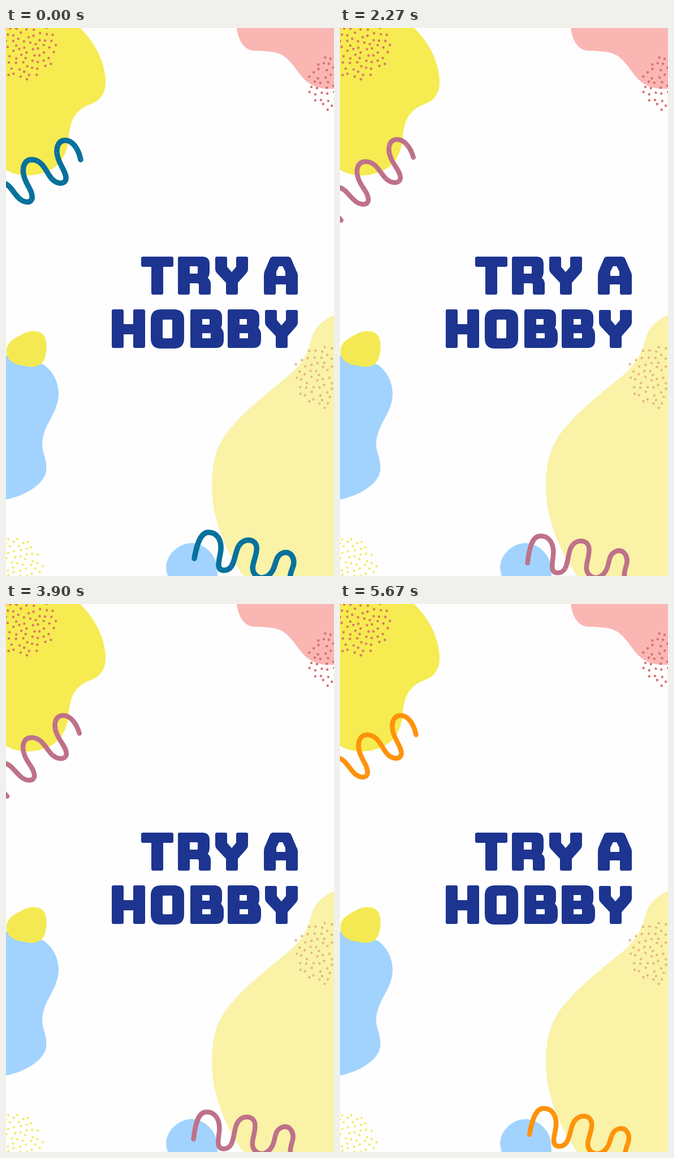
Recreate the animation shown at these times as an HTML page. Size 580 by 966 pixels, loop 5710 ms.

```html
<!DOCTYPE html>
<html lang="en">
<head>
<meta charset="utf-8">
<title>Try a hobby</title>
<style>
html, body { margin: 0; width: 100%; height: 100%; overflow: hidden; background: #fefefe; }
svg { display: block; width: 100%; height: 100%; }
.letters { fill: #1d3590; stroke: #1d3590; stroke-width: 6; stroke-linejoin: round; fill-rule: evenodd; }
.words { font: 900 80px Inter, sans-serif; fill: none; text-anchor: end; }
.line, .flecks { fill: none; stroke-linecap: round; stroke-linejoin: round; }
.flecks { stroke: #fff; stroke-width: 1.2; stroke-dasharray: 0 23 0 41 0 13 0 57; opacity: .6; }
</style>
</head>
<body>
<svg viewBox="0 0 580 966">
  <defs>
    <path id="upper" d="M132 232C128 212 117 198 105 198C91 198 87 214 92 229C96 243 107 255 106 266C104 277 90 275 81 266C71 255 66 233 46 232C31 232 28 248 32 262C36 277 48 288 46 301C43 310 31 307 24 301C13 291 8 277 -4 273"/>
    <path id="lower" d="M333 935C337 913 343 889 358 889C373 889 381 902 380 919C379 934 369 955 385 956C405 957 403 928 411 914C419 899 440 899 443 914C446 931 428 951 441 964C449 973 463 970 471 957C478 946 476 929 491 925C505 922 511 936 508 948C505 957 501 964 502 975"/>
    <path id="Y" d="M3 3H18V19L29 32L40 19V3H55V22Q55 25 53 27L37 45V64H22V45L5 27Q3 25 3 22Z"/>
    <path id="B" d="M3 3H42Q53 3 53 14V24Q53 30 50 33Q56 37 56 44V54Q56 65 45 65H3ZM18 14H33Q37 14 37 18V26Q37 30 33 30H18ZM18 39H35Q39 39 39 43V50Q39 54 35 54H18Z"/>
  </defs>

  <path fill="#f6eb51" d="M0 0H131C160 28 177 65 176 98C175 118 164 129 150 134C124 143 113 162 111 192C110 212 102 236 82 248C58 262 25 265 0 250Z"/>
  <path fill="#fab6b3" d="M408 0C411 20 418 36 436 40C458 41 478 40 492 50C508 62 515 78 527 90C539 102 556 109 580 107V0Z"/>
  <path fill="#f9f2a7" d="M580 506C555 517 543 534 539 552C533 578 518 598 497 615C450 653 403 690 380 730C360 765 361 825 371 863C380 897 396 935 420 966H580Z"/>
  <path fill="#a1d3fe" d="M0 577L66 593C83 605 94 625 93 648C91 680 65 700 64 733C64 750 73 760 71 780C69 805 30 826 0 831Z"/>
  <path fill="#f4e953" d="M1 567C3 552 17 546 32 538C46 531 66 533 70 548C73 562 72 577 66 587C60 597 48 599 35 596C18 594 -1 588 1 567Z"/>
  <path fill="#a1d3fe" d="M283 950C285 925 308 907 330 908C352 909 372 930 373 950L374 966H286C284 960 283 955 283 950Z"/>
  <g id="dots"></g>

  <text class="words" x="516" y="467">TRY A</text>
  <text class="words" x="516" y="560">HOBBY</text>
  <g class="letters">
    <path d="M242 406H293V418H275V467H260V418H242Z"/>
    <path d="M307 406H347Q357 406 357 416V430Q357 437 352 441Q359 444 359 451V467H344V453Q344 447 338 447H322V467H307ZM322 417V436H338Q342 436 342 431V421Q342 417 338 417Z"/>
    <use href="#Y" x="370" y="403"/>
    <path transform="translate(456 403)" d="M3 64V33Q3 30 4 27L13 6Q14 3 17 3H42Q45 3 46 6L55 27Q57 30 57 33V64H42V46H18V64ZM25 14H35L41 26V37H19V26Z"/>
    <path transform="translate(187 496)" d="M3 3H18V29H41V3H56V65H41V41H18V65H3Z"/>
    <path transform="translate(256 496)" d="M3 18Q3 3 18 3H41Q56 3 56 18V51Q56 66 41 66H18Q3 66 3 51ZM18 20Q18 15 23 15H36Q41 15 41 20V49Q41 54 36 54H23Q18 54 18 49Z"/>
    <use href="#B" x="326" y="496"/>
    <use href="#B" x="392" y="496"/>
    <use href="#Y" x="458" y="497"/>
  </g>

  <g id="squiggles">
    <g class="line"><use href="#upper"/><use href="#lower"/></g>
    <g class="flecks"><use href="#upper"/><use href="#lower"/></g>
    <path id="tail" class="line" d="M-4 332L2 339"/>
  </g>
</svg>
<script>
const LOOP = 5710, LAST = 5670, CYCLE = 600;
const byId = id => document.getElementById(id);

let seed = 7;
const rand = () => (seed = seed * 16807 % 2147483647) / 2147483647;

// Loose sunflower arrangement of dots inside a circle
function scatter(cx, cy, radius, gap, color, size) {
  let out = '';
  for (let i = 0; ; i++) {
    const r = gap * 0.56 * Math.sqrt(i + 0.5), a = i * 2.39996;
    if (r > radius) break;
    const x = cx + r * Math.cos(a) + (rand() - 0.5) * 4;
    const y = cy + r * Math.sin(a) + (rand() - 0.5) * 4;
    out += `<circle cx="${x.toFixed(1)}" cy="${y.toFixed(1)}" r="${size}"/>`;
  }
  return `<g fill="${color}">${out}</g>`;
}
byId('dots').innerHTML =
  scatter(30, 33, 59, 11, '#dc7763', 2.2) +
  scatter(584, 97, 52, 11.5, '#d8706f', 2.2) +
  scatter(568, 615, 58, 11.5, '#e6b881', 2.2) +
  scatter(8, 950, 56, 10.5, '#f4ea62', 2.1);

const blue = { color: '#06719c', width: 9.5, upper: '', lower: '' };
const orange = { color: '#fe920a', width: 8.5, upper: 'translate(2.5 -1.5)', lower: 'translate(2 0)' };
const pink = { color: '#be7189', width: 8.5, upper: 'rotate(-5 85 255)', lower: 'translate(-2 0) rotate(-4 450 930)' };

const lines = [...document.querySelectorAll('#squiggles use')];
let shown;
function show(pose) {
  if (pose === shown) return;
  shown = pose;
  byId('squiggles').setAttribute('stroke', pose.color);
  byId('squiggles').setAttribute('stroke-width', pose.width);
  lines.forEach(line => line.setAttribute('transform', pose[line.getAttribute('href').slice(1)]));
  byId('tail').style.display = pose === pink ? '' : 'none';
}

function draw(now) {
  const phase = Math.min(now % LOOP, LAST) % CYCLE;
  show(phase < 100 || phase >= 500 ? blue : phase < 300 ? orange : pink);
  requestAnimationFrame(draw);
}
draw(performance.now());
</script>
</body>
</html>
```
